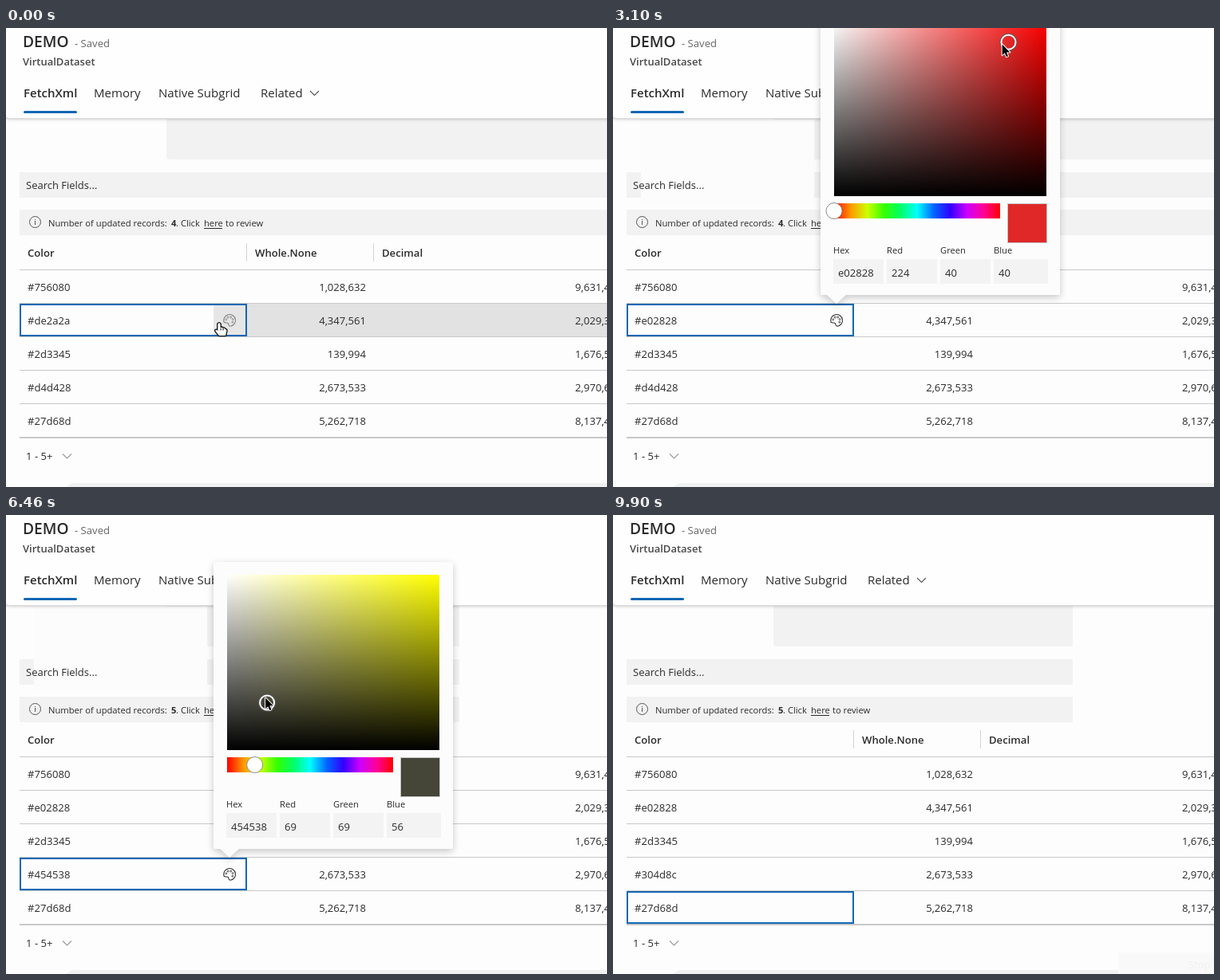
Animation, 753 px wide and 576 px high, one loop 9.92 s. Source, as an HTML page with a canvas:

```html
<!DOCTYPE html>
<html lang="en">
<head>
<meta charset="utf-8">
<title>Color column demo</title>
<style>
  html, body { margin: 0; width: 100%; height: 100%; overflow: hidden; background: #fdfdfd; }
  canvas { display: block; }
</style>
</head>
<body>
<canvas id="stage" width="753" height="576"></canvas>
<script>
const ctx = document.getElementById('stage').getContext('2d');
const W = 753, H = 576, LOOP = 9920;
const BLUE = '#1267b4', INK = '#2b2b2b', BAR = '#f2f2f2', PAPER = '#fdfdfd', RULE = '#c9c9c9';
const FONT = '"Open Sans", "Noto Sans", sans-serif';
const ROW_TOP = 304, ROW_H = 42;
const LOWER = 2 * ROW_H; // the second picker hangs two rows further down
const AREA = { x: 277, y: -9, w: 266, h: 220 };
const SLIDER = { x: 277, y: 220, w: 208, h: 19 };
const SPECTRUM = ['red', '#f90', '#cdff00', '#35ff00', '#0f6', '#00fffd', '#06f', '#3200ff', '#cd00ff', '#f09', 'red'];

const OPEN_1 = 270, CLOSE_1 = 3970, EDIT_2 = 4840, OPEN_2 = 5360, CLOSE_2 = 8680;
const DRAG_1 = [800, 2870], DRAG_2 = [5930, 6900], HUE_DRAG = [7330, 7520], DRAG_3 = [7700, 7900];

const channels = hex => hex.match(/../g).map(c => parseInt(c, 16));
const toHex = rgb => rgb.map(c => c.toString(16).padStart(2, '0')).join('');
const clamp = (v, [lo, hi]) => Math.min(hi, Math.max(lo, v));

// Where a colour lies on the saturation and value area.
function spot(hex, dy = 0) {
  const rgb = channels(hex), max = Math.max(...rgb), min = Math.min(...rgb);
  return [AREA.x + AREA.w * (1 - min / max), AREA.y + AREA.h * (1 - max / 255) + dy];
}
const hueSpot = hue => [SLIDER.x + SLIDER.w * hue / 360, 229.5 + LOWER];

// Pointer stops: arrival, departure, place.
const path = [
  [0, 210, [269, 376]],
  [DRAG_1[0], DRAG_1[0], spot('de2a2a')],
  [1240, 1240, spot('742e2e')],
  [1940, 1960, spot('541414')],
  [DRAG_1[1], 3040, spot('e02828')],
  [3740, 3760, [223, 427]],
  [4030, 4090, [220, 455]],
  [4260, 4430, [274, 457]],
  [4660, 4840, [250, 457]],
  [5010, 5480, [284, 459]],
  [DRAG_2[0], DRAG_2[0], spot('d4d428', LOWER)],
  [6460, 6480, spot('454538', LOWER)],
  [DRAG_2[1], DRAG_2[1], spot('26385e', LOWER)],
  [7220, HUE_DRAG[0], hueSpot(60)],
  [HUE_DRAG[1], HUE_DRAG[1], hueSpot(221)],
  [DRAG_3[0], DRAG_3[0], spot('26385e', LOWER)],
  [DRAG_3[1], DRAG_3[1], spot('304d8c', LOWER)],
  [8270, 8330, [262, 505]],
  [8500, 8970, [257, 515]],
  [9310, LOOP, [770, 590]]
];

function pointerAt(t) {
  const i = path.findIndex(([, leave]) => t <= leave);
  const [arrive, , to] = path[i];
  if (t >= arrive) return to;
  const [, left, from] = path[i - 1];
  const u = (t - left) / (arrive - left), k = u * u * (3 - 2 * u);
  return from.map((v, n) => v + (to[n] - v) * k);
}

// A handle rests where the latest drag has put it.
const dragged = (t, span) => pointerAt(clamp(t, span));

function handleAt(t, lower) {
  if (!lower) return dragged(t, DRAG_1);
  const [x, y] = dragged(t, t < DRAG_3[0] ? DRAG_2 : DRAG_3);
  return [x, y - LOWER];
}

function rgbAt([x, y], hue) {
  const s = (x - AREA.x) / AREA.w, v = 255 * (1 - (y - AREA.y) / AREA.h);
  return [5, 3, 1].map(n => {
    const k = (n + hue / 60) % 6;
    return Math.round(v - v * s * clamp(Math.min(k, 4 - k), [0, 1]));
  });
}

function rect(x, y, w, h, fill) {
  ctx.fillStyle = fill;
  ctx.fillRect(x, y, w, h);
}

function rounded(x, y, w, h, r, fill) {
  ctx.beginPath();
  ctx.roundRect(x, y, w, h, r);
  ctx.fillStyle = fill;
  ctx.fill();
}

function text(s, x, y, size, { color = INK, weight = 400, align = 'left' } = {}) {
  ctx.font = `${weight} ${size}px ${FONT}`;
  ctx.fillStyle = color;
  ctx.textAlign = align;
  ctx.fillText(s, x, y);
}

function disc(x, y, r, fill, stroke, width = 1) {
  ctx.beginPath();
  ctx.arc(x, y, r, 0, 7);
  if (fill) { ctx.fillStyle = fill; ctx.fill(); }
  if (stroke) { ctx.strokeStyle = stroke; ctx.lineWidth = width; ctx.stroke(); }
}

function shadow(color, blur, dy) {
  ctx.shadowColor = color;
  ctx.shadowBlur = blur;
  ctx.shadowOffsetY = dy;
}

function chevron(x, y, color) {
  ctx.beginPath();
  ctx.moveTo(x - 5.5, y - 2.5);
  ctx.lineTo(x, y + 3);
  ctx.lineTo(x + 5.5, y - 2.5);
  ctx.strokeStyle = color;
  ctx.lineWidth = 1.1;
  ctx.stroke();
}

function gradient(x0, y0, x1, y1, stops) {
  const g = ctx.createLinearGradient(x0, y0, x1, y1);
  stops.forEach((c, i) => g.addColorStop(i / (stops.length - 1), c));
  return g;
}

function drawPage(t, picker) {
  rect(0, 0, W, H, PAPER);
  // The right end of the bars stays blank once the lower picker has opened.
  const right = t < OPEN_2 ? W : picker ? 568 : 576;
  rounded(201, 108, right - 201, 57, [0, 0, 0, 4], BAR);
  for (const y of [181, 228]) rect(17, y, right - 17, 32, BAR);
  if (picker && t > DRAG_1[1]) rect(35, 115, 217, 106, '#fcfcfc');
  text('Search Fields...', 25, 202, 13);

  disc(36.5, 243.5, 7, null, '#555');
  rect(36, 242, 1, 5, '#555');
  rect(36, 240, 1, 1, '#555');
  text('Number of updated records:', 53, 249, 11.2);
  text(t < CLOSE_1 ? '4' : '5', 207, 249, 11.2, { weight: 700 });
  text('. Click', 213, 249, 11.2);
  text('here', 248, 249, 11.2);
  rect(248, 251, 23, 1, INK);
  text('to review', 275, 249, 11.2);

  shadow('rgba(0,0,0,.28)', 4, 1);
  rounded(0, -10, W + 20, 123, 4, '#fefefe');
  shadow('transparent', 0, 0);
  rect(0, 113, W, 1, '#dadada');
  text('DEMO', 21, 24, 19.2, { weight: 600 });
  text('- Saved', 86, 24, 13.1, { color: '#666' });
  text('VirtualDataset', 21, 47, 13, { weight: 600, color: '#484848' });
  text('FetchXml', 22, 87, 15, { weight: 600 });
  text('Memory', 110, 87, 15);
  text('Native Subgrid', 191, 87, 15);
  text('Related', 319, 87, 15);
  chevron(386.5, 81.5, '#555');
  rounded(22, 104, 67, 3, 1.5, BLUE);

  text('1 - 5+', 25, 542, 13.1);
  chevron(76.5, 537, '#999');
  rounded(72, 571, W, 30, 30, '#f1f1f1');
}

function drawTable(colors, hover, selected) {
  [['Color', 27], ['Whole.None', 312], ['Decimal', 471]].forEach(([name, x], i) => {
    text(name, x, 287, 13.1, { weight: 600 });
    if (i) rect(x - 11, 270, 1, 23, '#d4d4d4');
  });
  rect(17, ROW_TOP - 1, W, 1, RULE);

  const whole = ['1,028,632', '4,347,561', '139,994', '2,673,533', '5,262,718'];
  const decimal = ['9,631,4', '2,029,3', '1,676,5', '2,970,6', '8,137,4'];
  colors.forEach((color, i) => {
    const y = ROW_TOP + i * ROW_H;
    if (i === hover) rect(17, y, W, 41, i === selected ? '#e2e2e2' : '#e8e8e8');
    rect(17, y + 41, W, i < 4 ? 1 : 2, RULE);
    if (i === selected) {
      rect(17, y, 285, 41, BLUE);
      rect(19, y + 2, 281, 37, PAPER);
    }
    text('#' + color, 27, y + 26, 13.1);
    text(whole[i], 451, y + 26, 13.1, { align: 'right' });
    text(decimal[i], 713, y + 26, 13.1);
  });
}

const board = new Path2D('M-7 2A7.4 7.4 0 1 1 1 7.3C-1.5 7-.8 5.2-1.5 3.8C-2.4 2-4.6 4-7 2Z');

function drawIcon(row, hot) {
  const y = ROW_TOP + row * ROW_H, color = hot ? '#808080' : '#333';
  if (hot) rect(260, y + 2, 40, 37, '#e6e6e6');
  ctx.save();
  ctx.translate(280, y + 21);
  ctx.strokeStyle = color;
  ctx.lineWidth = 1.1;
  ctx.stroke(board);
  for (let a = 3.4; a < 7; a += .85) disc(4.4 * Math.cos(a), 4.4 * Math.sin(a), 1, null, color, .8);
  ctx.restore();
}

function drawPicker(dy, handle, hue, rgb, field, alpha) {
  ctx.save();
  ctx.globalAlpha = alpha;
  ctx.translate(0, dy);

  shadow('rgba(0,0,0,.22)', 10, 3);
  ctx.beginPath();
  ctx.roundRect(260, -25, 300, 360, 2);
  ctx.moveTo(268, 335);
  ctx.lineTo(280, 346);
  ctx.lineTo(292, 335);
  ctx.fillStyle = '#fcfcfc';
  ctx.fill();
  shadow('transparent', 0, 0);

  const { x, y, w, h } = AREA;
  const layers = [
    `hsl(${hue} 100% 50%)`,
    gradient(x, 0, x + w, 0, ['#fff', 'rgba(255,255,255,0)']),
    gradient(0, y, 0, y + h, ['rgba(0,0,0,0)', '#000'])
  ];
  for (const fill of layers) rect(x, y, w, h, fill);
  disc(...handle, 9.5, null, 'rgba(90,90,90,.7)', 3.4);
  disc(...handle, 9, null, '#fff', 2);

  rect(SLIDER.x, SLIDER.y, SLIDER.w, SLIDER.h, gradient(SLIDER.x, 0, SLIDER.x + SLIDER.w, 0, SPECTRUM));
  disc(hueSpot(hue)[0], 229.5, 10, '#fff', '#8a8a8a');
  rect(494, 220, 50, 50, '#c4c4c4');
  rect(495, 221, 48, 48, `rgb(${rgb})`);

  const values = [toHex(rgb), ...rgb];
  ['Hex', 'Red', 'Green', 'Blue'].forEach((label, i) => {
    const left = 276 + 67 * i;
    text(label, left, 283, 11.2);
    rect(left, 290, i < 3 ? 63 : 68, 31, field);
    text(values[i], left + 6, 312, 13.1);
  });
  ctx.restore();
}

const arrow = new Path2D('M0 0V13.6L3.1 10.7L5.2 15.6L7.4 14.7L5.3 9.9H9.6Z');
const hand = new Path2D('M-1.6 1.5Q0-1 1.6 1.5V6Q4 5 4.8 6.8Q7 6 7.6 8Q9.8 8 9.3 11L8 16H0L-4.5 10.5Q-5 8.3-3 9L-1.6 10Z');

function drawPointer(x, y, isHand) {
  ctx.save();
  ctx.translate(x, y);
  ctx.lineJoin = 'round';
  ctx.lineWidth = isHand ? 2.6 : 2;
  ctx.strokeStyle = isHand ? '#111' : '#fff';
  ctx.fillStyle = isHand ? '#fff' : '#000';
  const shape = isHand ? hand : arrow;
  ctx.stroke(shape);
  ctx.fill(shape);
  if (isHand) for (const fx of [1.6, 4.6]) rect(fx, 6.5, 1, 3, '#111');
  ctx.restore();
}

function draw(t) {
  const lower = t >= CLOSE_1;
  const opened = lower ? OPEN_2 : OPEN_1;
  const picker = t >= opened && t < (lower ? CLOSE_2 : CLOSE_1);
  const dy = lower ? LOWER : 0;
  const selected = t < CLOSE_1 ? 1 : t < CLOSE_2 ? 3 : 4;
  const icon = t < CLOSE_1 || (t >= EDIT_2 && t < CLOSE_2);

  const hue = (dragged(t, HUE_DRAG)[0] - SLIDER.x) / SLIDER.w * 360;
  const rgb1 = rgbAt(handleAt(t, false), 0), rgb2 = rgbAt(handleAt(t, true), hue);

  const [hx, hy] = pointerAt(t), px = hx - 2, py = hy - 6;
  const overPicker = picker && px > 260 && px < 560 && py < 335 + dy;
  const row = Math.floor((py - ROW_TOP) / ROW_H);
  const hover = overPicker || px > W ? -1 : row;
  const overIcon = icon && hover === selected && px >= 260 && px < 301;

  drawPage(t, picker);
  drawTable(['756080', toHex(rgb1), '2d3345', toHex(rgb2), '27d68d'], hover, selected);
  if (icon) drawIcon(selected, overIcon && !picker);
  if (picker) {
    const alpha = Math.min(1, .3 + (t - opened) / 150);
    const field = t > HUE_DRAG[0] ? '#fbfbfb' : '#f3f3f3';
    drawPicker(dy, handleAt(t, lower), lower ? hue : 0, lower ? rgb2 : rgb1, field, alpha);
  }
  if (t >= 9250) rect(633, 549, 120, 27, '#f9f9f9');
  if (t >= 9730) text('Stop', 721, 569, 13, { color: '#efefef' });
  drawPointer(px, py, overIcon);
}

const start = performance.now();
function tick() {
  draw((performance.now() - start) % LOOP);
  requestAnimationFrame(tick);
}
tick();
</script>
</body>
</html>
```
